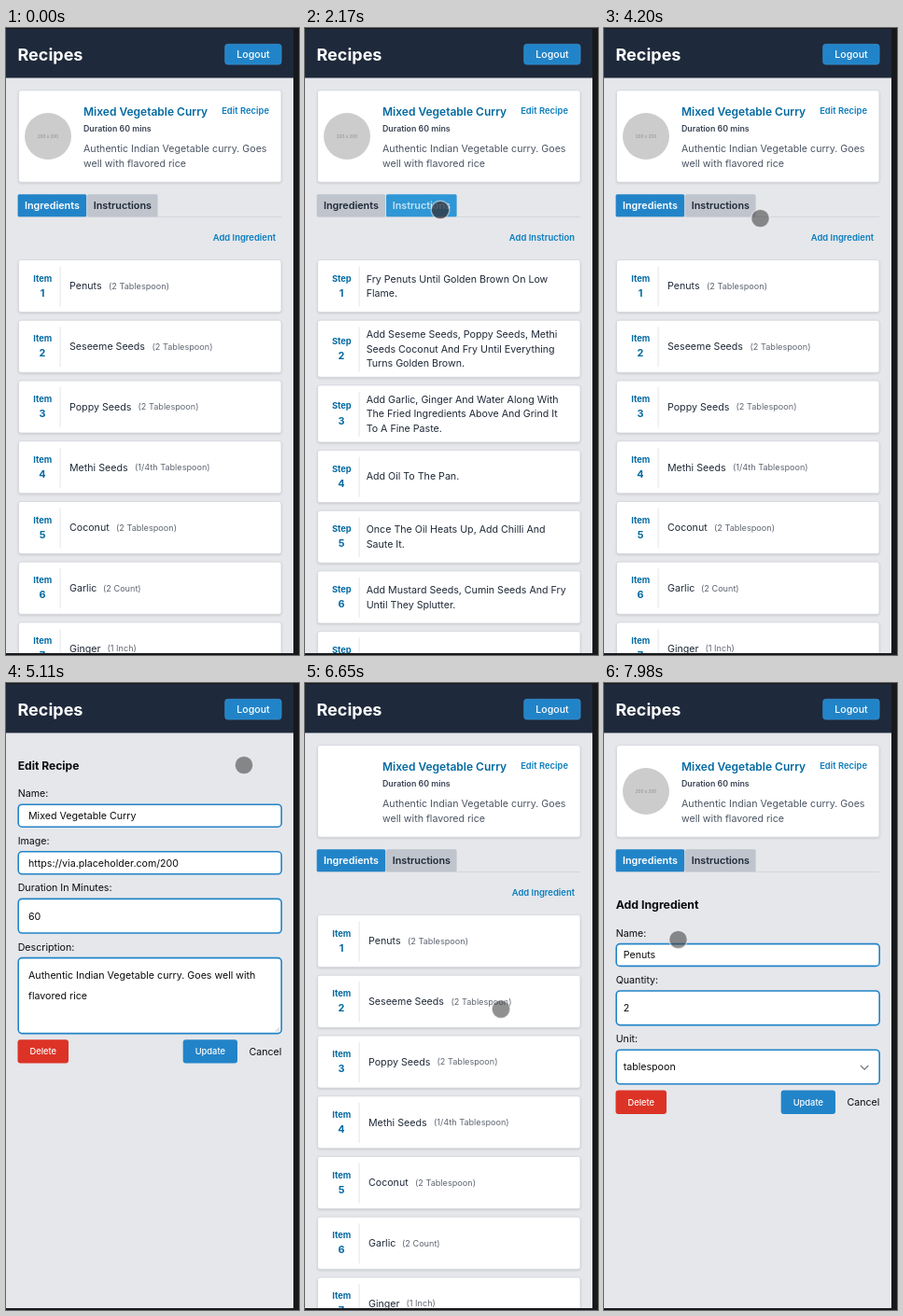
These frames come from a looping animation (314x672 px, 8000 ms). An HTML page:

```html
<!DOCTYPE html>
<html lang="en">
<head>
<meta charset="utf-8">
<title>Recipes</title>
<style>
html, body { margin: 0; width: 100%; height: 100%; overflow: hidden; background: #18191c; }
svg { display: block; width: 314px; height: 672px; font-family: Inter, Roboto, sans-serif; }
.card { filter: drop-shadow(0 1px 1px rgba(0, 0, 0, .13)); }
</style>
</head>
<body>
<svg id="stage" viewBox="0 0 314 672"></svg>
<script>
const BLUE = '#2284c8', DEEP = '#0369a1', LINK = '#0a7cbd', INK = '#1f2937', BLACK = '#0b0b0d';
const BODY = 10.65;

// Text is placed by the vertical middle of its capitals.
const text = (s, x, mid, size = BODY, fill = INK, weight = 400, anchor = 'start') =>
  `<text x="${x}" y="${mid + size * .36}" font-size="${size}" fill="${fill}" font-weight="${weight}" text-anchor="${anchor}">${s}</text>`;
const box = (x, y, w, h, fill, r = 0, extra = '') =>
  `<rect x="${x}" y="${y}" width="${w}" height="${h}" rx="${r}" fill="${fill}" ${extra}/>`;
const group = (id, body) => `<g id="${id}">${body}</g>`;
const card = (y, h) => box(13.5, y, 281.5, h, '#fff', 2.5, 'class="card" stroke="#d3d6dc" stroke-width=".8"');
const link = (s, right, mid) => text(s, right, mid, 9.45, LINK, 600, 'end');
const button = (s, x, y, w, h, fill, size = 9.35) =>
  box(x, y, w, h, fill, 3) + text(s, x + w / 2, y + h / 2, size, '#fff', 500, 'middle');
const field = (y, h) => box(13.2, y, 282, h, '#fff', 4, `stroke="${BLUE}" stroke-width="1.6"`);
const label = (s, mid) => text(s, 12.7, mid, BODY, BLACK);
const actions = y => button('Delete', 12.5, y, 54.5, 25.3, '#dc3326') +
  button('Update', 189.7, y, 58.3, 25.3, BLUE) + text('Cancel', 295.3, y + 13, BODY, BLACK, 400, 'end');

function row(kind, n, y, h, body) {
  const mid = y + h / 2;
  return card(y, h) +
    text(kind, 39.3, mid - 8.3, 9.3, DEEP, 700, 'middle') +
    text(n, 39, mid + 7.3, 10.8, DEEP, 700, 'middle') +
    box(57.6, y + 7, 1, h - 13, '#e2e4e8') + body(mid);
}

const tab = (id, s, x, w) => box(x, 178.3, w, 24, BLUE, 1.5, `id="${id}Box"`) +
  group(id + 'Text', text(s, x + w / 2, 189.8, 10.8, 'inherit', 600, 'middle'));

const items = [
  ['Penuts', '2 Tablespoon', 110], ['Seseeme Seeds', '2 Tablespoon', 156.5],
  ['Poppy Seeds', '2 Tablespoon', 141.5], ['Methi Seeds', '1/4th Tablespoon', 138],
  ['Coconut', '2 Tablespoon', 118], ['Garlic', '2 Count', 104], ['Ginger', '1 Inch', 108.5]
].map(([name, qty, x], i) => row('Item', i + 1, 248.5 + i * 64.75, 56, mid =>
  text(name, 68, mid) + text(`(${qty})`, x, mid, 9.15, '#5f6672'))).join('');

let nextY = 248.5;
const steps = [
  ['Fry Penuts Until Golden Brown On Low', 'Flame.'],
  ['Add Seseme Seeds, Poppy Seeds, Methi', 'Seeds Coconut And Fry Until Everything', 'Turns Golden Brown.'],
  ['Add Garlic, Ginger And Water Along With', 'The Fried Ingredients Above And Grind It', 'To A Fine Paste.'],
  ['Add Oil To The Pan.'],
  ['Once The Oil Heats Up, Add Chilli And', 'Saute It.'],
  ['Add Mustard Seeds, Cumin Seeds And Fry', 'Until They Splutter.'],
  ['Add Onions.']
].map((lines, i) => {
  const h = lines.length > 2 ? 61 : 56, y = nextY;
  nextY += h + 8.7;
  return row('Step', i + 1, y, h, mid => lines.map((s, k) =>
    text(s, 65.7, mid + (k - (lines.length - 1) / 2) * 15.5)).join(''));
}).join('');

document.getElementById('stage').innerHTML =
  box(0, 1, 308, 669, '#e5e7eb') +
  group('recipe',
    card(66.8, 98.4) +
    group('photo', '<circle cx="45" cy="116" r="25" fill="#ccc"/>' + text('200 x 200', 45, 116.3, 4.6, '#969696', 500, 'middle')) +
    text('Mixed Vegetable Curry', 83, 90, 12, DEEP, 600) +
    link('Edit Recipe', 282, 89) +
    text('Duration 60 mins', 83, 107.8, 8.8, '#374151', 600) +
    text('Authentic Indian Vegetable curry. Goes', 83, 129.3, BODY, '#4b5563') +
    text('well with flavored rice', 83, 144.8, BODY, '#4b5563') +
    box(13, 202, 282, .9, '#d2d5da') +
    tab('ingTab', 'Ingredients', 12.6, 73.6) + tab('insTab', 'Instructions', 87, 75.6)) +
  group('items', link('Add Ingredient', 289, 225) + items) +
  group('steps', link('Add Instruction', 289, 225) + steps) +
  group('edit',
    text('Edit Recipe', 12.7, 89, 12.1, BLACK, 700) +
    label('Name:', 118.5) + field(130.2, 24) + text('Mixed Vegetable Curry', 24, 142.3, BODY, BLACK) +
    label('Image:', 169.5) + field(180.8, 24) + text('https://via.placeholder.com/200', 24, 193, BODY, BLACK) +
    label('Duration In Minutes:', 219.5) + field(231.4, 36.6) + text('60', 24, 249.7, BODY, BLACK) +
    label('Description:', 283.3) + field(294.6, 81) +
    text('Authentic Indian Vegetable curry. Goes well with', 24, 313.6, BODY, BLACK) +
    text('flavored rice', 24, 335.6, BODY, BLACK) +
    '<path d="M289 373.5l4-4M291.5 373.5l1.5-1.5" stroke="#888" stroke-width=".6"/>' + actions(382.2)) +
  group('add',
    text('Add Ingredient', 12.7, 238, 12.3, BLACK, 700) +
    label('Name:', 268.5) + field(279.6, 23.8) + text('Penuts', 20.7, 291.6, BODY, BLACK) +
    label('Quantity:', 318.5) + field(330, 36.6) + text('2', 20.7, 348.5, BODY, BLACK) +
    label('Unit:', 381.5) + field(393.2, 36.6) + text('tablespoon', 20.7, 411.6, BODY, BLACK) +
    '<path d="M275 410l4.2 4.2 4.2-4.2" fill="none" stroke="#6b7280" stroke-width="1.1"/>' + actions(436.6)) +
  box(0, 1, 308, 52.5, '#1e293b') +
  text('Recipes', 12.5, 28.3, 18, '#fff', 700) +
  box(234.7, 17.3, 60.4, 21.8, BLUE, 3, 'stroke="#3c93d0" stroke-width=".7"') +
  text('Logout', 265, 28.3, 10.6, '#fff', 500, 'middle') +
  '<path id="arrow" d="M0 0v14.2l3.2-3 2.3 5.5 2.5-1-2.3-5.4h4.5z" fill="#000" stroke="#fff" stroke-width="1" stroke-linejoin="round"/>' +
  '<circle id="touch" r="9.8" stroke="#fff" stroke-opacity=".5" stroke-width="1.4"/>' +
  box(308, 0, 6, 672, '#18191c') + box(0, 670, 308, 2, '#18191c') + box(0, 0, 308, 1, '#18191c');

const el = id => document.getElementById(id);
const show = (id, on) => el(id).setAttribute('display', on ? 'inline' : 'none');

// Pointer path: time, x, y
const path = [
  [210, 184, 612], [490, 180, 260], [560, 180, 260], [700, 173, 261], [1050, 173, 261], [1120, 169.7, 245.5],
  [1190, 170, 244], [1330, 170, 244], [1680, 147, 197], [1820, 147, 197], [1890, 145, 195],
  [3360, 145, 195], [3640, 52, 190], [4060, 52, 190], [4130, 110, 199], [4200, 167.5, 204], [4690, 255, 88],
  [5180, 255, 88], [5740, 276.5, 391.5], [6230, 276.5, 391.5], [6650, 210, 349.5],
  [7070, 46, 276], [7350, 38, 272], [7840, 38, 272], [7980, 79.5, 275]
];
const presses = [[2030, 2240], [3640, 3780], [4900, 5040], [6090, 6230], [7700, 7910]];
const screens = [[0, 'items'], [2100, 'steps'], [3710, 'items'], [5040, 'edit'], [6300, 'items'], [7910, 'add']];

function pointerAt(t) {
  const i = path.findIndex(p => p[0] >= t);
  if (i < 1) return path[0].slice(1);
  const [t0, x0, y0] = path[i - 1], [t1, x1, y1] = path[i], k = (t - t0) / (t1 - t0);
  return [x0 + (x1 - x0) * k, y0 + (y1 - y0) * k];
}

function paintTab(id, active, hover) {
  el(id + 'Box').setAttribute('fill', active ? (hover ? '#2f97d6' : BLUE) : '#bfc4cd');
  el(id + 'Text').setAttribute('fill', active ? (hover ? '#c3e2f5' : '#fff') : INK);
}

function draw(now) {
  const t = Math.floor(now % 8000 / 70) * 70;
  const current = screens.filter(s => s[0] <= t).pop()[1];
  for (const id of ['items', 'steps', 'edit', 'add']) show(id, id === current);
  show('recipe', current !== 'edit');
  show('photo', t < 6300 || t >= 7000);
  paintTab('ingTab', current !== 'steps', false);
  paintTab('insTab', current === 'steps', t < 2310);

  const at = `translate(${pointerAt(t)})`;
  show('arrow', t >= 210 && t < 1190);
  show('touch', t >= 1190);
  el('arrow').setAttribute('transform', at);
  el('touch').setAttribute('transform', at);
  const pressed = presses.some(([a, b]) => t >= a && t < b);
  el('touch').setAttribute('fill', pressed ? 'rgba(50,50,55,.75)' : 'rgba(60,60,60,.57)');
  requestAnimationFrame(draw);
}
requestAnimationFrame(draw);
</script>
</body>
</html>
```
